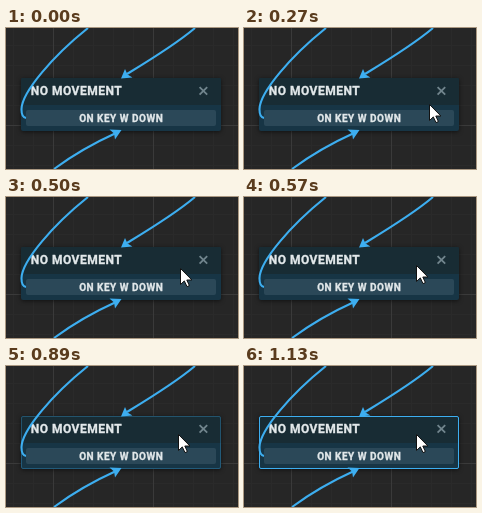
Recreate the animation shown at these times as an HTML page. Size 232 by 141 pixels, loop 1590 ms.

```html
<!DOCTYPE html>
<html lang="en">
<head>
<meta charset="utf-8">
<title>Graph node selection</title>
<style>
  html, body { margin: 0; width: 100%; height: 100%; overflow: hidden; background: #262626; }
  svg { display: block; width: 232px; height: 141px; }
  text {
    font: 700 12px Roboto, "Liberation Sans", sans-serif;
    letter-spacing: .5px;
    fill: #e2e8ea; stroke: #e2e8ea; stroke-width: .35px;
  }
  .label { font-size: 10px; text-anchor: middle; }
  .wire { fill: none; stroke: #3daef0; stroke-width: 2.1; }
  .head { fill: #3daef0; }
  .node { filter: drop-shadow(0 1px 2px rgba(0, 0, 0, .55)); }
</style>
</head>
<body>
<svg viewBox="0 0 232 141">
  <rect width="232" height="141" fill="#262626"/>
  <g id="grid" shape-rendering="crispEdges"></g>

  <g class="node">
    <rect x="15" y="50" width="200" height="53" rx="2" fill="#173545"/>
    <path d="M15 77V52a2 2 0 0 1 2-2H213a2 2 0 0 1 2 2V77Z" fill="#182c34"/>
  </g>
  <rect x="20" y="82" width="190" height="16" rx="2" fill="#2b4858"/>
  <text x="24.7" y="67">NO MOVEMENT</text>
  <text class="label" x="115.2" y="94">ON KEY W DOWN</text>
  <path d="M193.6 59.1l7.6 7.6m0-7.6l-7.6 7.6" stroke="#71858d" stroke-width="1.8"/>
  <rect id="outline" x="15.5" y="50.5" width="199" height="52" rx="1.5" fill="none" stroke="#3daef0"/>

  <path class="wire" d="M82 0C47 28 16 64 15.5 81C15.4 86 16.5 89.5 20 90"/>
  <path class="wire" d="M189 0C169 17 144 32 121 46"/>
  <path class="head" d="M115 50.5L119 41L121.5 46.5L126.5 49.5Z"/>
  <path class="wire" d="M48 141C67 127 88 115 109 105.5"/>
  <path class="head" d="M115.5 102L103.5 101.5L108 105.5L109 111.5Z"/>

  <path id="cursor" d="M.5.5V16.5L4.3 12.9L7 18.6L9.4 17.6L6.8 12H11.9Z"
        fill="#fff" stroke="#111" stroke-width="1" stroke-linejoin="round"/>
</svg>
<script>
const LOOP = 1590;
const $ = id => document.getElementById(id);

// [start ms, x, y] of the pointer tip
const moves = [
  [190, 198, 81], [270, 185, 76], [340, 178, 73],
  [420, 176, 72], [500, 174, 71], [570, 172, 68]
];
// [start ms, opacity] of the selection outline
const glow = [[0, 0], [820, .04], [890, .3], [980, .65], [1050, .88], [1130, 1]];

const at = (table, t) => table.filter(step => step[0] <= t).pop();

function drawGrid() {
  const line = (x, y, w, h, color) =>
    `<rect x="${x}" y="${y}" width="${w}" height="${h}" fill="${color}"/>`;
  const lines = (step, color) => {
    let out = '';
    for (let x = 47 % step; x < 232; x += step) out += line(x, 0, 1, 141, color);
    for (let y = 97 % step; y < 141; y += step) out += line(0, y, 232, 1, color);
    return out;
  };
  $('grid').innerHTML = lines(20, '#2a2a2a') + lines(100, '#3a3a3a');
}

function render(now) {
  const t = now % LOOP;
  const tip = at(moves, t);
  $('cursor').style.visibility = tip ? 'visible' : 'hidden';
  if (tip) $('cursor').setAttribute('transform', `translate(${tip[1]} ${tip[2]})`);
  $('outline').setAttribute('opacity', at(glow, t)[1]);
}

drawGrid();
const start = performance.now();
function tick() {
  render(performance.now() - start);
  requestAnimationFrame(tick);
}
tick();
</script>
</body>
</html>
```
